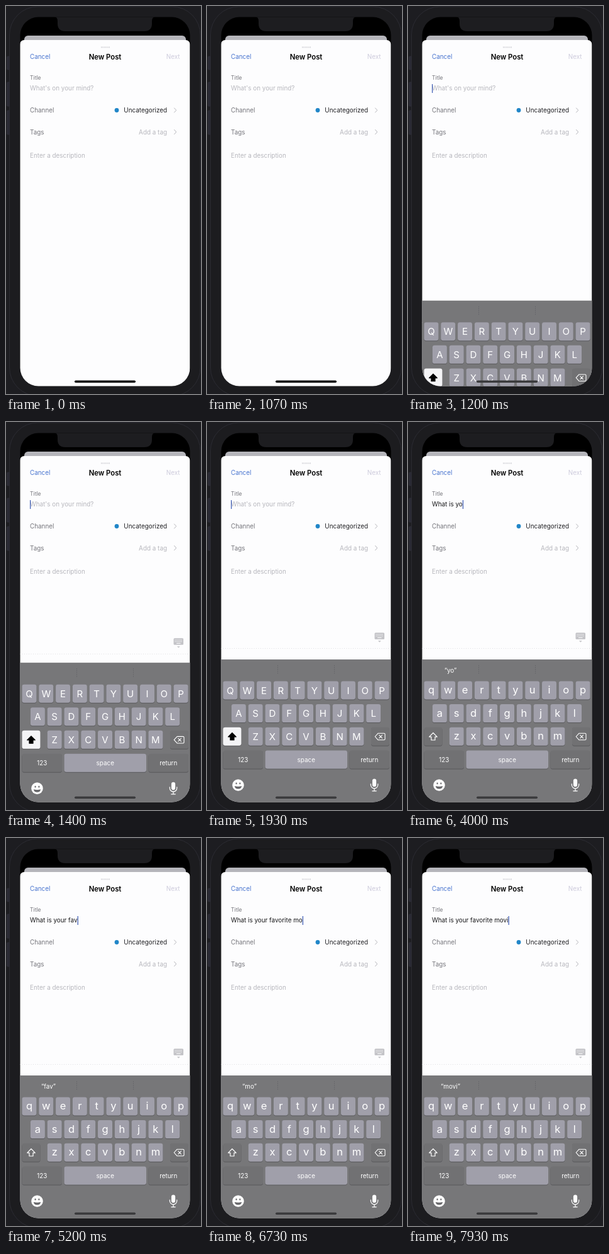
An HTML page that plays this animation: 310 px wide and 616 px high, repeating every 8000 ms.

```html
<!DOCTYPE html>
<html lang="en">
<head>
<meta charset="utf-8">
<title>New Post</title>
<style>
html, body { margin: 0; width: 100%; height: 100%; overflow: hidden; background: #1d1d21; }
svg { display: block; width: 100%; height: 100%; }
text { font-family: Inter, "Liberation Sans", sans-serif; font-size: 9.9px; white-space: pre; }
.mid { text-anchor: middle; }
.end { text-anchor: end; }
.line { fill: none; stroke-linecap: round; stroke-linejoin: round; }
.hint { fill: #b7b7bd; }
.label { fill: #75757b; }
#keys text { fill: #fff; }
</style>
</head>
<body>
<svg viewBox="0 0 310 616" xmlns="http://www.w3.org/2000/svg">
  <defs>
    <clipPath id="screen"><rect x="22.5" y="17.5" width="270" height="586" rx="29"/></clipPath>
  </defs>

  <rect width="310" height="616" fill="#1d1d21"/>
  <g fill="#2a2a34" stroke="#33333c" stroke-width=".7">
    <rect x="1.5" y="80" width="6" height="21" rx="1"/>
    <rect x="1.5" y="121" width="6" height="38" rx="1"/>
    <rect x="1.5" y="166" width="6" height="38" rx="1"/>
    <rect x="5.5" y="1" width="303.5" height="618" rx="45" fill="#1c1c1f"/>
  </g>

  <g clip-path="url(#screen)">
    <rect x="22" y="17" width="272" height="588"/>
    <path d="M76 17Q82 17 82 24V28Q82 40 94 40H220Q232 40 232 28V24Q232 17 238 17Z" fill="#1d1d20"/>
    <rect x="29" y="47" width="257" height="20" rx="6" fill="#b5b5bb"/>
    <rect x="22" y="54" width="270.5" height="570" rx="7" fill="#fdfdfe"/>

    <path d="M151 65.5H166" stroke="#d3d3d8" stroke-width="2" stroke-dasharray="1.5 1"/>
    <text x="38" y="84" fill="#4874cf">Cancel</text>
    <text x="157.5" y="84.5" class="mid" font-weight="600" style="font-size:11.3px">New Post</text>
    <text x="276.5" y="84" class="end" fill="#cdcbdc">Next</text>

    <text x="38" y="117" class="label" style="font-size:8.6px">Title</text>
    <text id="hint" x="38" y="134" class="hint">What's on your mind?</text>
    <text id="title" x="38" y="134" fill="#161618"></text>
    <rect id="caret" y="124" width="1.3" height="14" fill="#4663b8"/>

    <text x="38" y="169" class="label">Channel</text>
    <circle cx="176" cy="165.5" r="3.4" fill="#2186c8"/>
    <text x="256" y="169" class="end" fill="#202024">Uncategorized</text>
    <text x="38" y="203.5" class="label">Tags</text>
    <text x="256" y="203.5" class="end hint">Add a tag</text>
    <path d="M267.5 162l3.2 3.5-3.2 3.5M267.5 196.5l3.2 3.5-3.2 3.5" class="line" stroke="#b5b5bb"/>
    <text x="38" y="241" class="hint">Enter a description</text>

    <g id="bar">
      <rect x="266.5" y="334.5" width="15.5" height="10.5" rx="1.5" fill="#c4c4c8"/>
      <path d="M268.5 337.3H280M268.5 339.8H280" stroke="#fdfdfe" stroke-dasharray="1.2 1"/>
      <path d="M271 342.5H277.5" stroke="#fdfdfe"/>
      <path d="M271.8 347.3h5l-2.5 2.4z" fill="#c4c4c8"/>
      <path d="M22 359.5H293" stroke="#d6d6da" stroke-width=".8" stroke-dasharray="1 2.5"/>
    </g>

    <g id="board">
      <rect x="22" y="377" width="272" height="260" fill="#777779"/>
      <path d="M112.5 386V400M202.5 386V400" stroke="#606064" stroke-width=".8" stroke-dasharray="1.5 1.5"/>
      <text id="guess" x="67.5" y="397.5" class="mid" fill="#fff"></text>
      <g id="keys"></g>
      <path id="arrow" d="M40 493.5l6.3 6.3h-3.3v5.2h-6v-5.2h-3.3z" class="line" stroke-width="1.2"/>
      <path d="M272 494.2h9.5q1.5 0 1.5 1.5v7.6q0 1.5-1.5 1.5H272l-4.8-5.3zM273.8 497.2l4.6 4.6M278.4 497.2l-4.6 4.6" class="line" stroke="#fff" stroke-width="1.1"/>

      <circle cx="49.5" cy="576.5" r="9.3" fill="#fff"/>
      <g fill="#69696c">
        <ellipse cx="46.6" cy="573.8" rx="1.1" ry="1.5"/>
        <ellipse cx="52.4" cy="573.8" rx="1.1" ry="1.5"/>
        <path d="M43.8 578q5.7 1.6 11.4 0-.8 4.6-5.7 4.6t-5.7-4.6z"/>
      </g>

      <rect x="262.9" y="566.5" width="6.2" height="12.5" rx="3.1" fill="#fff"/>
      <path d="M260.3 574.5v1.6a5.7 5.7 0 0 0 11.4 0v-1.6M266 582v3.7M262.8 585.8h6.4" class="line" stroke="#fff" stroke-width="1.2"/>
    </g>

    <rect id="home" x="109" y="594.5" width="97" height="3.4" rx="1.7"/>
  </g>
</svg>

<script>
const LOOP = 8000, STEP = 1000 / 15;
const TITLE = "What is your favorite movi";
const TYPING = [[1830, 0], [6690, 24], [7600, 26]];
const PITCH = 26.78, KEY = "#a09faa", DARK_KEY = "#717173";

const $ = id => document.getElementById(id);
const [hint, title, caret, bar, board, guess, keys, arrow, home] =
  ["hint", "title", "caret", "bar", "board", "guess", "keys", "arrow", "home"].map($);

function add(tag, attrs, text = "") {
  const el = document.createElementNS("http://www.w3.org/2000/svg", tag);
  for (const name in attrs) el.setAttribute(name, attrs[name]);
  el.textContent = text;
  return keys.appendChild(el);
}

function addKey(x, y, width, fill) {
  const box = { x, width, height: 29, rx: 3.4 };
  add("rect", { ...box, y: y + 1, fill: "#58585b" });
  return add("rect", { ...box, y, fill });
}

const letters = [];
[["qwertyuiop", 37], ["asdfghjkl", 50.4], ["zxcvbnm", 77.2]].forEach(([row, left], r) => {
  [...row].forEach((char, i) => {
    const x = left + i * PITCH, y = 411.5 + r * 36.6;
    addKey(x - 11.5, y, 23, KEY);
    letters.push({ char, y, el: add("text", { x, class: "mid" }) });
  });
});
const shift = addKey(25.5, 484.7, 29, DARK_KEY);
addKey(261, 484.7, 29, DARK_KEY);
[["123", 25.5, 63.5, DARK_KEY], ["space", 92.5, 130.5, KEY], ["return", 226.5, 63.5, DARK_KEY]]
  .forEach(([name, x, width, fill]) => {
    addKey(x, 521.5, width, fill);
    add("text", { x: x + width / 2, y: 539.5, class: "mid" }, name);
  });

function setCase(upper) {
  for (const { el, char, y } of letters) {
    el.textContent = upper ? char.toUpperCase() : char;
    el.style.fontSize = upper ? "15px" : "16.5px";
    el.setAttribute("y", y + (upper ? 20.2 : 19.6));
  }
  shift.setAttribute("fill", upper ? "#f4f4f6" : DARK_KEY);
  arrow.style.fill = upper ? "#000" : "none";
  arrow.style.stroke = upper ? "#000" : "#fff";
}

// Critically damped spring: remaining distance after `start`.
function slide(t, start, distance) {
  const x = Math.max(0, t - start) * 0.01826;
  return distance * (1 + x) * Math.exp(-x);
}

function typedCount(t) {
  for (let i = 1; i < TYPING.length; i++) {
    const [t0, n0] = TYPING[i - 1], [t1, n1] = TYPING[i];
    if (t < t1) return n0 + Math.floor(Math.max(0, (t - t0) / (t1 - t0)) * (n1 - n0));
  }
  return TITLE.length;
}

let upperNow = null;

function render(time) {
  const t = Math.floor((time + 4) / STEP) * STEP;
  const text = TITLE.slice(0, typedCount(t));
  const word = text.split(" ").pop();
  const open = t > 1085;

  title.textContent = text;
  hint.setAttribute("visibility", text ? "hidden" : "visible");
  guess.textContent = text.length > 4 && word ? `“${word}”` : "";
  caret.setAttribute("visibility", open ? "visible" : "hidden");
  caret.setAttribute("x", 38 + (text ? title.getComputedTextLength() : 0));

  board.setAttribute("transform", `translate(0 ${slide(t, 1085, 239)})`);
  bar.setAttribute("transform", `translate(0 ${slide(t, 1110, 280)})`);
  home.setAttribute("fill", open ? "#3a3a3c" : "#000");

  const upper = !text;
  if (upper !== upperNow) setCase(upperNow = upper);
}

const begin = performance.now();
function tick() {
  render((performance.now() - begin) % LOOP);
  requestAnimationFrame(tick);
}
tick();
</script>
</body>
</html>
```
